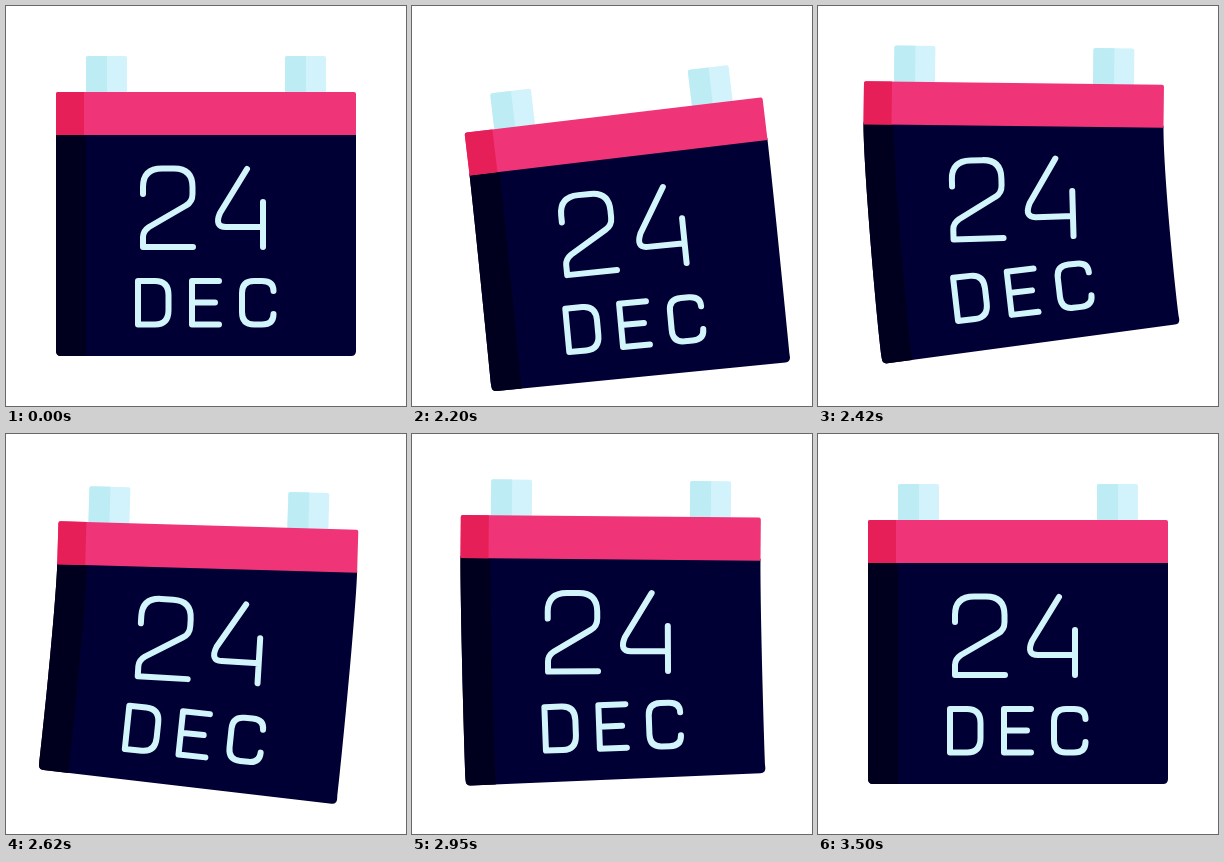
An HTML page that plays this animation: 400 px wide and 400 px high, repeating every 3520 ms.

```html
<!DOCTYPE html>
<html lang="en">
<head>
<meta charset="utf-8">
<title>Calendar</title>
<style>
  html, body { margin: 0; width: 100%; height: 100%; overflow: hidden; background: #fff; }
  svg { display: block; width: 100%; height: 100%; }
  .ink { fill: none; stroke: #d2f4fb; stroke-width: 6; stroke-linecap: round; stroke-linejoin: round; }
</style>
</head>
<body>
<svg viewBox="0 0 400 400" role="img" aria-label="24 DEC">
  <path id="body" fill="#000034"/>
  <path id="shade" fill="#00001e"/>
  <g id="header">
    <g id="tab">
      <rect x="80" y="50" width="41" height="37" rx="2" fill="#d2f3fb"/>
      <path d="M101 50H82Q80 50 80 52V87H101Z" fill="#beecf5"/>
    </g>
    <use href="#tab" x="199"/>
    <path d="M52 86H348Q350 86 350 88V129H50V88Q50 86 52 86Z" fill="#f03478"/>
    <path d="M78 86H52Q50 86 50 88V129H78Z" fill="#e71f59"/>
  </g>
  <g id="day" class="ink">
    <path d="M137 188V181Q137 162.5 156 162.5H168Q186.5 162.5 186.5 181V188Q186.5 196 180 199.5L143 221Q137 225 137 231V241H187"/>
    <path d="M241 163L214 207Q208 221 220 221H257M257 196V241"/>
  </g>
  <g id="month" class="ink">
    <path d="M132 275H149Q162.5 275 162.5 289V304Q162.5 318.5 149 318.5H132Z"/>
    <path d="M213 275H186V318.5H213M186 296.5H209"/>
    <path d="M267.5 285Q267.5 275 256 275H248Q236 275 236 287V306Q236 318.5 248 318.5H256Q267.5 318.5 267.5 308"/>
  </g>
</svg>
<script>
const LOOP = 3520, START = 2000, STEP = 25;

// Turning points of the header's motion
const swingTimes = [2250, 2535, 2745, 3060, 3330], swingAngles = [-7.5, 4.6, -3, 1.8, 0];
const liftTimes = [2200, 2425, 2650, 2975, 3230, 3450];
const liftX = [1.5, -4, 2.6, -1.2, .4, 0], liftY = [23, -9, 6, -3.8, 1, 0];

const el = id => document.getElementById(id);
const sin = deg => Math.sin(deg * Math.PI / 180);
const cos = deg => Math.cos(deg * Math.PI / 180);
const mix = (a, b, k) => a + (b - a) * k;
const ease = k => (1 - Math.cos(Math.PI * Math.min(1, Math.max(0, k)))) / 2;

// Eases from one turning point to the next; a lagging part also starts later
function sway(t, times, peaks, lag = 0) {
  let from = START + lag / 2, value = 0;
  times.forEach((time, i) => {
    const to = time + lag;
    if (t > from) value = mix(value, peaks[i], ease((t - from) / (to - from)));
    from = to;
  });
  return value;
}

// A row is a rigid line of the sheet, turning about (200, pivot)
const place = (id, { x, y, angle, pivot }) =>
  el(id).setAttribute('transform', `translate(${x} ${y}) rotate(${angle} 200 ${pivot})`);

const point = ({ x, y, angle, pivot }) => (px, py) => {
  const dx = px - 200, dy = py - pivot, s = sin(angle), c = cos(angle);
  return `${(200 + x + dx * c - dy * s).toFixed(2)} ${(pivot + y + dx * s + dy * c).toFixed(2)} `;
};

function sheet(top, bottom, right, r) {
  const T = point(top), B = point(bottom);
  return `M${T(50, 127)}C${T(50, 167)}${B(50, 305)}${B(50, 345)}Q${B(50, 350)}${B(55, 350)}` +
    `L${B(right - r, 350)}Q${B(right, 350)}${B(right, 350 - r)}` +
    `C${B(right, 305)}${T(right, 167)}${T(right, 127)}Z`;
}

function draw(t) {
  const header = {
    x: sway(t, liftTimes, liftX),
    y: sway(t, liftTimes, liftY),
    angle: sway(t, swingTimes, swingAngles),
    pivot: 86
  };
  // Each row hangs from the one above and swings later and wider
  const hang = (above, pivot, lag, gain, length = pivot - above.pivot) => {
    const angle = gain * sway(t, swingTimes, swingAngles, lag);
    return {
      x: above.x - length * sin(mix(above.angle, angle, .6)),
      y: header.y - .4 * Math.abs(angle) * (pivot - 86) / 264,
      angle, pivot
    };
  };
  const day = hang(header, 200, 35, 1);
  const month = hang(day, 296, 90, 1.3);
  const bottom = hang(month, 350, 95, 1.45, 65);

  place('header', header);
  place('day', day);
  place('month', month);
  el('body').setAttribute('d', sheet(header, bottom, 350, 5));
  el('shade').setAttribute('d', sheet(header, bottom, 80, 0));
}

const start = performance.now();
function frame() {
  const t = Math.max(0, performance.now() - start) % LOOP;
  // 40 steps a second, shown on a 10 ms clock
  draw(Math.floor(Math.floor(t / 10) * .4 + .36) * STEP);
  requestAnimationFrame(frame);
}
frame();
</script>
</body>
</html>
```
